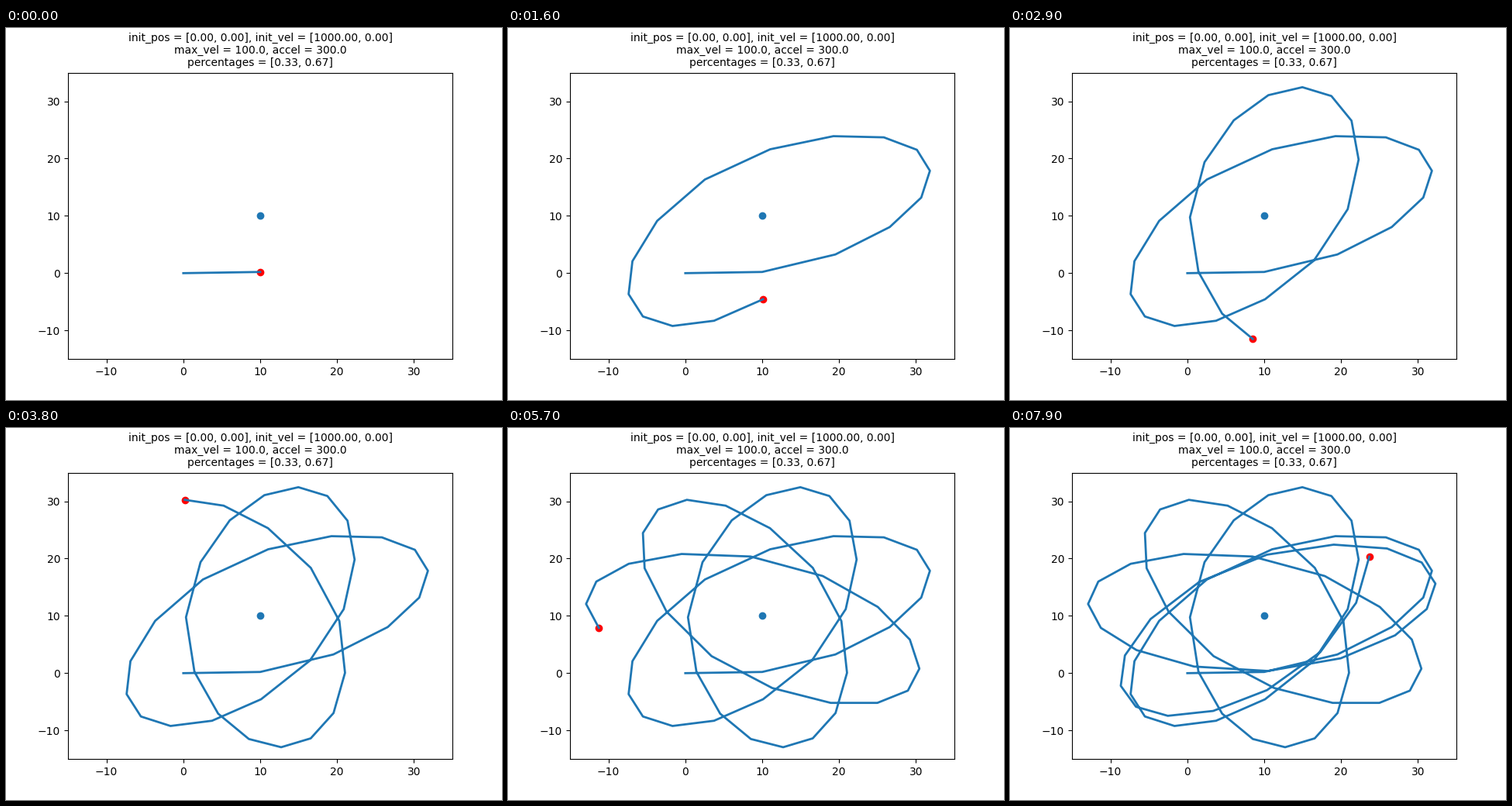
Write a matplotlib script that moves like this. It is 640 by 480 pixels and loops after 8 s.

```python
import numpy as np
import matplotlib.pyplot as plt
from matplotlib.animation import FuncAnimation

INIT_POS = np.array([0.0, 0.0])
INIT_VEL = np.array([1000.0, 0.0])
TARGET = np.array([10.0, 10.0])
MAX_VEL = 100.0
ACCEL = 300.0
PERCENTAGES = [0.33, 0.67]
DT = 0.1
FRAMES = 80


def simulate(steps):
    """Pull a speed-limited point towards TARGET with constant acceleration."""
    pos, vel = INIT_POS.copy(), INIT_VEL.copy()
    path = [pos]
    for _ in range(steps):
        offset = TARGET - pos
        vel = vel + ACCEL * DT * offset / np.linalg.norm(offset)
        speed = np.linalg.norm(vel)
        if speed > MAX_VEL:
            vel = vel * MAX_VEL / speed
        pos = pos + vel * DT
        path.append(pos)
    return np.array(path)


def pair(values):
    return "[" + ", ".join(f"{v:.2f}" for v in values) + "]"


path = simulate(FRAMES)

fig, ax = plt.subplots(figsize=(6.4, 4.8), dpi=100)
ax.set(xlim=(-15, 35), ylim=(-15, 35))
ax.set_xticks(range(-10, 31, 10))
ax.set_yticks(range(-10, 31, 10))
ax.set_title(
    f"init_pos = {pair(INIT_POS)}, init_vel = {pair(INIT_VEL)}\n"
    f"max_vel = {MAX_VEL}, accel = {ACCEL}\n"
    f"percentages = {pair(PERCENTAGES)}",
    fontsize=10,
)

ax.scatter(*TARGET, color="C0")
head = ax.scatter(*path[1], color="red")
trail, = ax.plot([], [], color="C0", lw=2)


def update(frame):
    seen = path[:frame + 2]
    trail.set_data(seen[:, 0], seen[:, 1])
    head.set_offsets(seen[-1:])
    return trail, head


anim = FuncAnimation(fig, update, frames=FRAMES, interval=1000 * DT,
                     repeat=True, repeat_delay=0)
plt.show()
```
